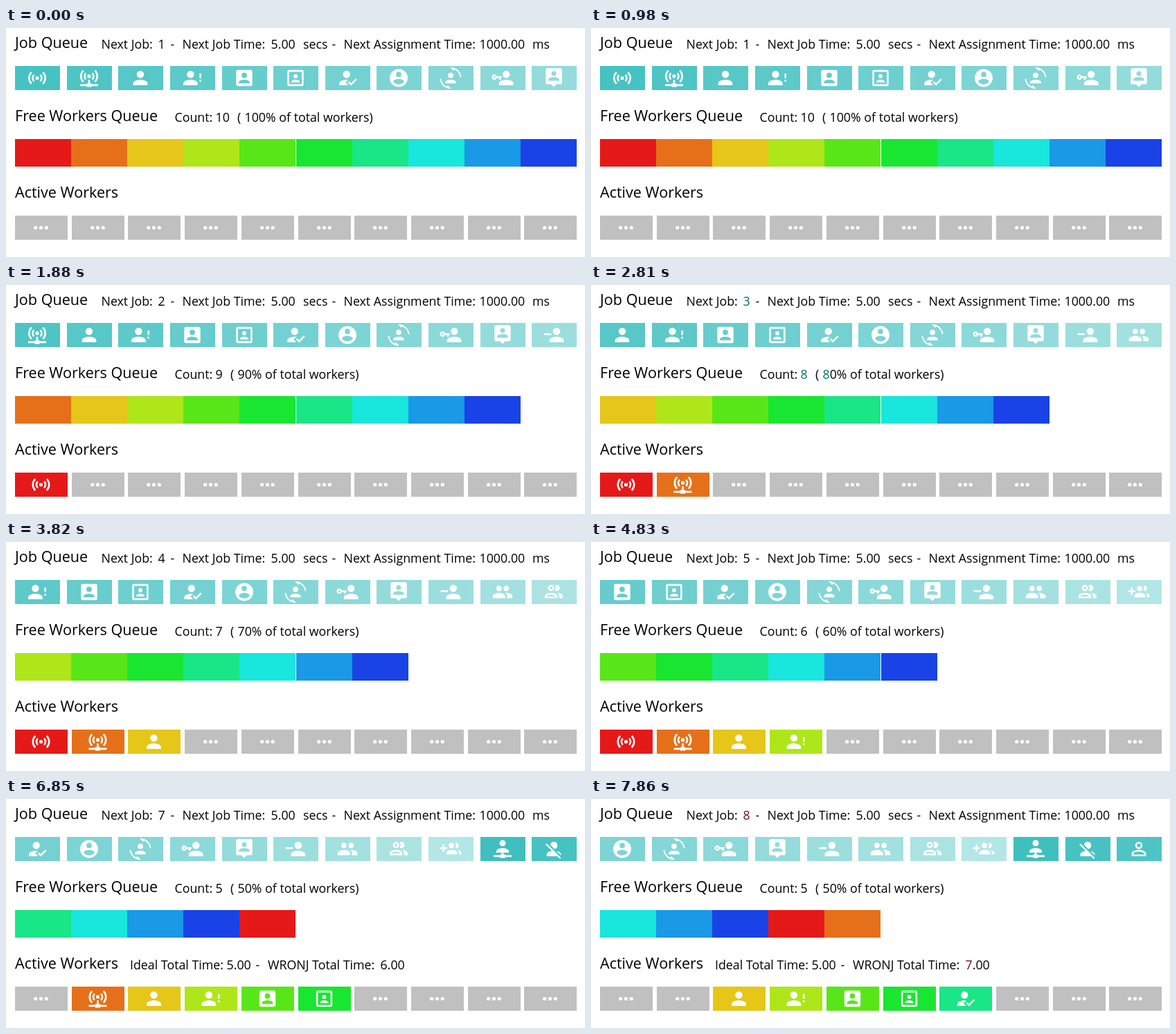
Write an HTML page with a canvas that moves like this. It is 836x332 px and loops after 8000 ms.

```html
<!DOCTYPE html>
<html lang="en">
<head>
<meta charset="utf-8">
<title>Job queue</title>
<style>
  html, body { margin: 0; width: 100%; height: 100%; overflow: hidden; background: #fff; }
  canvas, svg { position: absolute; left: 0; top: 0; width: 836px; height: 332px; }
  text { font: 17.8px "Open Sans", "Noto Sans", sans-serif; fill: #000; }
  .head { font-size: 21.6px; }
</style>
</head>
<body>
<canvas id="stage" width="836" height="332"></canvas>
<svg id="labels" viewBox="0 0 836 332"></svg>
<script>
const LOOP = 8000, START = 1800, TICK = 1010;
const WORKERS = 10, JOB_TICKS = 5, LEFT = 13, RIGHT = 824;
const g = document.getElementById('stage').getContext('2d');
const labels = document.getElementById('labels');

// Path pieces on a 24 unit grid; overlaps become holes (even-odd fill).
const disc = (x, y, r) =>
  `M${x - r} ${y}a${r} ${r} 0 1 0 ${2 * r} 0a${r} ${r} 0 1 0 ${-2 * r} 0z`;
const box = (x, y, w, h) => `M${x} ${y}h${w}v${h}h${-w}z`;
const bust = (x, y, a, h) =>
  `M${x} ${y}c${.55 * a} 0 ${a} ${.3 * h} ${a} ${.67 * h}v${.33 * h}h${-2 * a}` +
  `v${-.33 * h}c0 ${-.37 * h} ${.45 * a} ${-.67 * h} ${a} ${-.67 * h}z`;
const person = (x = 12) => disc(x, 8, 4) + bust(x, 14, 8, 6);
const smallPerson = disc(12, 9, 3) + bust(12, 13.9, 6, 4.1);
const frame = 'M5 3h14a2 2 0 0 1 2 2v14a2 2 0 0 1-2 2h-14a2 2 0 0 1-2-2v-14a2 2 0 0 1 2-2z';
const pole = y => `M13 ${y}V18h1a1 1 0 0 1 1 1h7v2h-7a1 1 0 0 1-1 1h-4` +
  `a1 1 0 0 1-1-1h-7v-2h7a1 1 0 0 1 1-1h1V${y}z`;

function wave(cy, r, dir) {
  const o = (r + 1) * Math.SQRT1_2, i = (r - 1) * Math.SQRT1_2;
  const s = dir > 0 ? 1 : 0;
  return `M${12 + dir * o} ${cy - o}A${r + 1} ${r + 1} 0 0 ${s} ${12 + dir * o} ${cy + o}` +
    `L${12 + dir * i} ${cy + i}A${r - 1} ${r - 1} 0 0 ${1 - s} ${12 + dir * i} ${cy - i}z`;
}
const signal = cy => disc(12, cy, 2) +
  [5, 9].map(r => wave(cy, r, 1) + wave(cy, r, -1)).join('');

const icons = [
  signal(12),
  signal(10) + pole(14),
  person(),
  person(10) + box(20, 7, 2, 5) + box(20, 14, 2, 2),
  frame + smallPerson,
  frame + box(5, 5, 14, 14) + disc(12, 10, 2.25) + bust(12, 14, 4.5, 3),
  disc(11, 8, 4) + 'M10 17L13 20H3V18C3 15.8 6.6 14 11 14L12.9 14.1z' +
    'M21.1 12.5L22.5 13.9L16 20.5L12.5 17L13.9 15.6L16 17.7z',
  disc(12, 12, 10) + disc(12, 8, 3) +
    'M12 19.2C9.5 19.2 7.3 17.9 6 16C6 14 10 12.9 12 12.9C14 12.9 18 14 18 16C16.7 17.9 14.5 19.2 12 19.2z',
  smallPerson +
    'M7.5 21.5L8.85 20.16L12.66 23.97L12 24C5.7 24 .56 19.16 .05 13H1.55C1.9 16.76 4.25 19.94 7.5 21.5z' +
    'M16.5 2.5L15.15 3.84L11.34 .03L12 0C18.3 0 23.44 4.84 23.95 11H22.45C22.1 7.24 19.75 4.07 16.5 2.5z',
  person(16) + disc(3, 11, 1) +
    'M11 10v2h-1v2h-2v-2H5.83A3 3 0 1 1 5.83 10z',
  'M19 1H5A2 2 0 0 0 3 3V17A2 2 0 0 0 5 19H9L12 22L15 19H19A2 2 0 0 0 21 17V3A2 2 0 0 0 19 1z' +
    disc(12, 7, 2.7) + bust(12, 11, 6, 4),
  person(15) + box(1, 10, 8, 2),
  disc(8, 8, 3) + disc(16, 8, 3) + bust(8, 13, 7, 6) +
    'M16 13L15 13.05C16.2 13.9 17 15 17 16.5V19H23V16.5C23 14.2 18.3 13 16 13z',
  disc(9, 7.5, 3.5) + disc(9, 7.5, 1.5) +
    'M13.07 10.4A5 5 0 0 0 13.07 4.6A3.4 3.4 0 0 1 15 4A3.5 3.5 0 0 1 15 11A3.4 3.4 0 0 1 13.07 10.4z' +
    'M16 17V19H2V17S2 13 9 13S16 17 16 17zM14 17C13.9 16.2 12.7 15 9 15S4 16.3 4 17z' +
    'M15.95 13A5.3 5.3 0 0 1 18 17V19H22V17S22 13.4 15.95 13z',
  disc(13, 8, 3) + bust(13, 13, 6, 5) +
    'M19.6 13.2C20.5 13.9 21 14.8 21 16V18H24V16C24 14.5 21.6 13.5 19.6 13.2z' +
    'M18 11A3 3 0 0 0 18 5L17.1 5.15A5 5 0 0 1 17.1 10.85z' +
    'M8 10H5V7H3V10H0V12H3V15H5V12H8z',
  disc(12, 5.5, 3.5) + bust(12, 11, 7, 5) + pole(16),
  'M12 4A4 4 0 0 1 12.75 11.93L8.07 7.25A4 4 0 0 1 12 4z' +
    'M12.28 14L20 21.72L18.73 23L15.73 20H4V18C4 16.2 6.5 14.6 9.87 14.14L2.78 7.05L4.05 5.78z' +
    'M20 18V19.18L15.14 14.32C18 14.9 20 16.35 20 18z',
  disc(12, 8, 4) + disc(12, 8, 2.1) +
    'M12 13C9.3 13 4 14.3 4 17V20H20V17C20 14.3 14.7 13 12 13z' +
    'M12 14.9C15 14.9 18.1 16.4 18.1 17V18.1H5.9V17C5.9 16.4 9 14.9 12 14.9z'
].map(d => new Path2D(d));
const dots = new Path2D([6, 12, 18].map(x => disc(x, 12, 2)).join(''));

const jobColor = job => `hsl(180, 50%, ${50 + 2 * (job % 16)}%)`;
const workerColor = i => `hsl(${25.3 * i}, 80%, 50%)`;

function tile(x, y, w, h, color, icon) {
  g.fillStyle = color;
  g.fillRect(x, y, w, h);
  if (!icon) return;
  g.save();
  g.translate(x + w / 2 - .5, y + h / 2);
  g.scale(1.3, 1.3);
  g.translate(-12, -12);
  g.fillStyle = '#fff';
  g.fill(icon, 'evenodd');
  g.restore();
}

function drawTiles(step) {
  g.clearRect(0, 0, 836, 332);
  g.save();
  g.beginPath();
  g.rect(LEFT, 0, RIGHT - LEFT, 332);
  g.clip();
  for (let i = 0; i < 11; i++) {
    const job = step + i;
    tile(Math.round(LEFT + 74.63 * i), 55, 65, 35, jobColor(job + 1), icons[job]);
  }
  const free = WORKERS - Math.min(step, JOB_TICKS);
  for (let i = 0; i < free; i++) {
    tile(Math.round(LEFT + 81.1 * i), 161, 81, 40, workerColor((step + i) % WORKERS));
  }
  for (let i = 0; i < WORKERS; i++) {
    const busy = i < step && i >= step - JOB_TICKS;
    tile(Math.round(LEFT + 81.7 * i), 272, 76, 35,
      busy ? workerColor(i) : '#c0c0c0', busy ? icons[i] : dots);
  }
  g.restore();
  return free;
}

function drawLabels(step, free) {
  const tint = { 2: '#00784a', 7: '#6a1414' }[step] || '#000';
  const mark = s => `<tspan fill="${tint}">${s}</tspan>`;
  const row = (y, parts) =>
    parts.map(([x, s]) => `<text x="${x}" y="${y}">${s}</text>`).join('');
  const head = (y, s) => `<text class="head" x="13" y="${y}">${s}</text>`;
  const wide = free === WORKERS ? 10 : 0;
  const fresh = step <= JOB_TICKS ? mark : s => s;

  let out = head(29, 'Job Queue') + row(30, [
    [137.5, 'Next Job:'], [219.5, mark(step + 1)], [237.5, '-'],
    [254.5, 'Next Job Time:'], [382.5, '5.00'], [429, 'secs'], [470.5, '-'],
    [487.5, 'Next Assignment Time:'], [683.5, '1000.00'], [760, 'ms']
  ]);
  out += head(135, 'Free Workers Queue') + row(136, [
    [243.5, 'Count:'], [302.5, fresh(free)], [324 + wide, '('],
    [334.5 + wide, `${fresh(free)}0% of total workers)`]
  ]);
  out += head(246, 'Active Workers');
  if (step > JOB_TICKS) out += row(247, [
    [179, 'Ideal Total Time:'], [318.5, '5.00'], [360.5, '-'],
    [378, 'WRONJ Total Time:'], [540.5, mark(step) + '.00']
  ]);
  labels.innerHTML = out;
}

let shown = -1;
function render(now) {
  const t = now % LOOP;
  const step = t < START ? 0 : 1 + Math.floor((t - START) / TICK);
  if (step !== shown) {
    shown = step;
    drawLabels(step, drawTiles(step));
  }
}

const begin = performance.now();
function loop() {
  render(performance.now() - begin);
  requestAnimationFrame(loop);
}
loop();
</script>
</body>
</html>
```
